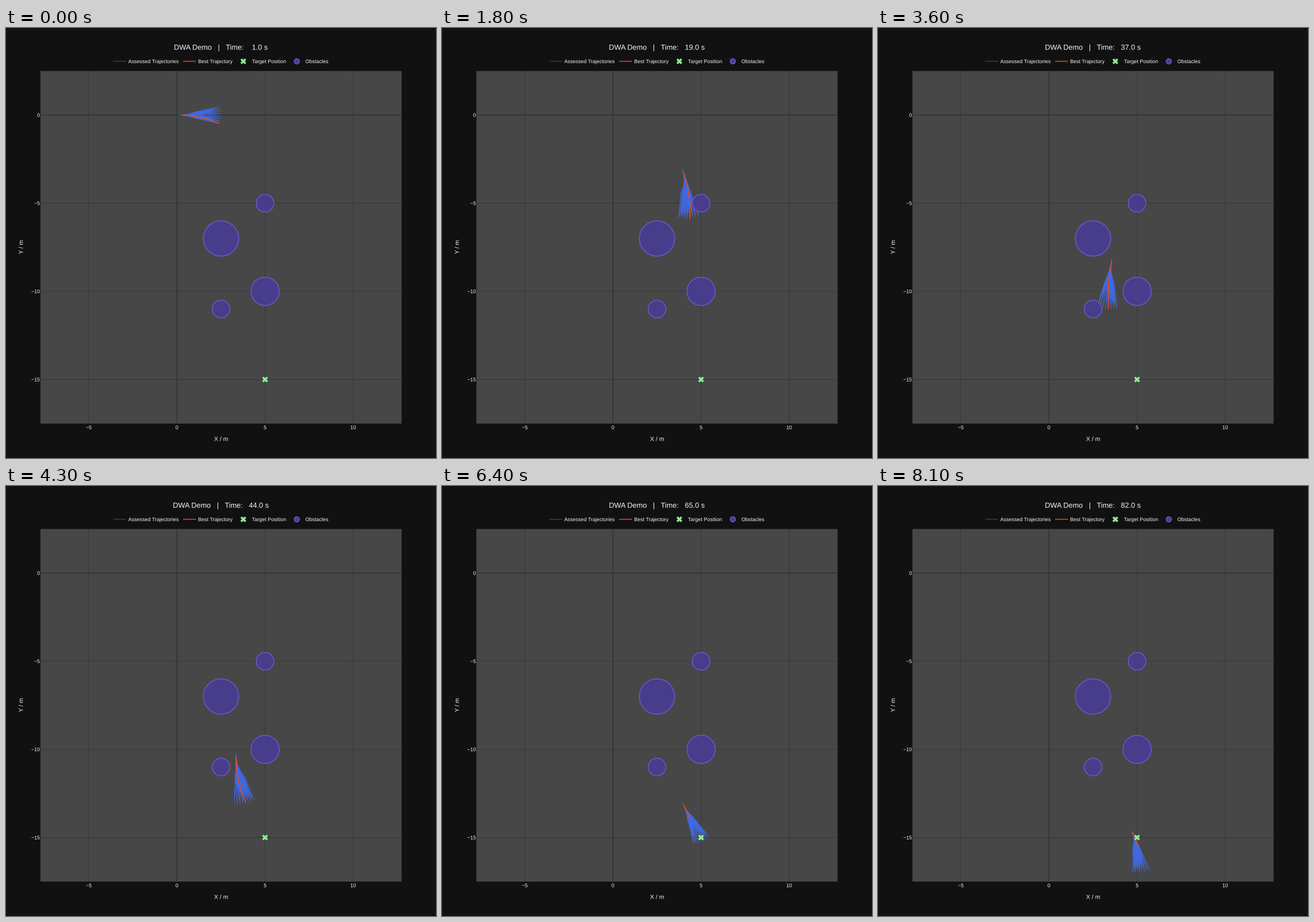
A matplotlib script for the animation above (8.2 s loop, 748 by 748 pixels).

```python
import numpy as np
import matplotlib.pyplot as plt
from matplotlib.animation import FuncAnimation
from matplotlib.collections import LineCollection
from matplotlib.patches import Circle, PathPatch, Polygon, Rectangle
from matplotlib.textpath import TextPath
from matplotlib.transforms import Affine2D

STAGE, DPI, UNITS = 748, 100, 1000
ZOOM = STAGE / UNITS
LINE = ZOOM * 72 / DPI          # one layout unit in points
METRE = 41                      # layout units per metre
FRAMES, INTERVAL = 82, 100

INK, PAPER, FIELD, GRID = "#f2f5fa", "#111111", "#474747", "#283442"
BLUE, ORANGE, GREEN = "royalblue", "orangered", "lightgreen"
FILL, EDGE = "darkslateblue", "slateblue"

fig = plt.figure(figsize=(STAGE / DPI, STAGE / DPI), dpi=DPI, facecolor=PAPER)
ax = fig.add_axes([0, 0, 1, 1])
ax.set(xlim=(0, UNITS), ylim=(UNITS, 0))
ax.axis("off")


def to_x(metres):
    return 397.5 + METRE * metres


def to_y(metres):
    return 202.5 - METRE * metres


def text_path(text, size, align="left"):
    path = TextPath((0, 0), text, size=size, prop={"family": "Liberation Sans"})
    box = path.get_extents()
    shift = {"left": 0, "center": -(box.x0 + box.x1) / 2, "right": -box.x1 - 0.5}
    return path.transformed(Affine2D().translate(shift[align], 0))


def write(x, y, text, size=12, align="left", angle=0):
    place = Affine2D().scale(1, -1).rotate_deg(angle).translate(x, y)
    return ax.add_patch(PathPatch(text_path(text, size, align), fc=INK, lw=0,
                                  zorder=6, transform=place + ax.transData))


def stroke(xs, ys, color, width, z):
    return ax.plot(xs, ys, color=color, lw=width * LINE, zorder=z, snap=False,
                   solid_capstyle="butt")[0]


def disc(x, y, radius):
    ax.add_patch(Circle((x, y), radius, fc=FILL, ec=EDGE, lw=2 * LINE, zorder=5))


def cross(x, y, size=12):
    """Two diagonal bars: one arm, turned four times."""
    arm = np.array([(1, 0), (2, 1), (1, 2)]) * size * 0.4 / np.sqrt(2)
    turns = [np.array([(0, 1), (-1, 0)])] * 4
    points = []
    for quarter in turns:
        points.extend(arm)
        arm = arm @ quarter
    ax.add_patch(Polygon(np.array(points) + (x, y), fc=GREEN, lw=0, zorder=4))


# plot area, grid and axis labels
ax.add_patch(Rectangle((80, 100), 840, 820, fc=FIELD, lw=0, zorder=0, snap=False))
for tick in range(-15, 11, 5):
    label = str(tick).replace("-", "\u2212")
    width = 1 if tick else 2
    if tick >= -5:
        stroke([to_x(tick)] * 2, [100, 920], GRID, width, 1)
        write(to_x(tick), 933, label, align="center")
    if tick <= 0:
        stroke([80, 920], [to_y(tick)] * 2, GRID, width, 1)
        write(79, to_y(tick) + 4.2, label, align="right")
write(500, 960.3, "X / m", 14, "center")
write(39.5, 510, "Y / m", 14, "center", -90)

# legend
LEGEND_Y = 77.5
stroke([249.3, 279.3], [LEGEND_Y] * 2, BLUE, 1, 2)
stroke([411.8, 441.8], [LEGEND_Y] * 2, ORANGE, 2, 2)
cross(552, LEGEND_Y)
disc(676.3, LEGEND_Y, 6)
for x, name in ((284.3, "Assessed Trajectories"), (446.8, "Best Trajectory"),
                (572, "Target Position"), (696.3, "Obstacles")):
    write(x, LEGEND_Y + 4.2, name)

# scene
cross(to_x(5), to_y(-15))
for x, y, radius in ((2.5, -7, 1), (5, -5, 0.5), (5, -10, 0.8), (2.5, -11, 0.5)):
    disc(to_x(x), to_y(y), radius * METRE)

# way points: step, stage x, stage y, heading and turn rate in degrees
STEP, X, Y, HEADING, TURN = np.array([
    (0, 301, 151.5, 0, 0),
    (1, 308.7, 151.7, 2.5, 2.5),
    (11, 388, 197, 47.8, 2.7),
    (25, 426.3, 303, 91, 2.5),
    (26, 425.8, 312, 93, 0),
    (31, 417.5, 357, 106, 1.8),
    (36, 407, 402, 101, -1.1),
    (45, 400.5, 483, 88, -2.6),
    (50, 403, 514, 70, -0.4),
    (80, 440.7, 598.3, 66, -0.3),
    (81, 442, 601, 66, 2.4)]).T
SLOW, FAST, ACCELERATION, BRAKE_END = 0.1, 0.3, 0.15, 48
HORIZON, SPREAD = 9.5, 2.5
SPEEDS, TURNS = 16, 8


def speed_at(step):
    """Metres per step: speed up at once, slow down before the target."""
    return np.clip(min(SLOW + ACCELERATION * step, SLOW + 0.05 * (BRAKE_END - step)),
                   SLOW, FAST)


def turn_at(step):
    return np.interp(step, STEP, TURN)


def position(step):
    """Cubic Hermite curve through the way points."""
    i = min(np.searchsorted(STEP, step, side="right"), len(STEP) - 1)
    ends = [i - 1, i]
    p0, p1 = np.column_stack([X, Y])[ends] / ZOOM
    v0, v1 = (METRE * speed_at(STEP[k]) * direction(np.radians(HEADING[k]))
              for k in ends)
    span = STEP[i] - STEP[i - 1]
    u = (step - STEP[i - 1]) / span
    blend = u * u * (3 - 2 * u)
    return (p0 + (p1 - p0) * blend
            + span * u * (1 - u) * ((1 - u) * v0 - u * v1))


def direction(angle):
    return np.stack([np.cos(angle), np.sin(angle)], axis=-1)


def heading_at(step):
    dx, dy = position(step + 0.01) - position(step)
    return np.arctan2(dy, dx)


def arc(start, heading, speed, turn, begin=0):
    t = np.linspace(begin, HORIZON, 24)
    half = np.radians(turn) * t / 2
    reach = METRE * speed * t * np.sinc(half / np.pi)
    return start + reach[:, None] * direction(heading + half)


title = write(500, 50.5, "DWA Demo", 17)
fan = ax.add_collection(LineCollection([], colors=BLUE, linewidths=LINE, zorder=2),
                        autolim=False)
best = stroke([], [], ORANGE, 2, 3)


def draw(step):
    clock = f"{step + 1:.1f}"
    gap = " " * (7 - len(clock))
    title.set_path(text_path(f"DWA Demo   |   Time:{gap}{clock} s", 17, "center"))

    start, heading, speed = position(step), heading_at(step), speed_at(step)
    speeds = np.linspace(max(SLOW, speed - ACCELERATION),
                         min(FAST, speed + ACCELERATION), SPEEDS)
    turns = turn_at(step) + np.linspace(-SPREAD, SPREAD, TURNS)
    fan.set_segments([arc(start, heading, v, w) for v in speeds for w in turns])

    # the chosen path is the one the robot follows next
    following = (step + 1) % FRAMES
    chosen = turns[np.argmin(abs(turns - turn_at(following)))]
    best.set_data(*arc(start, heading, speed_at(following), chosen, 0.6).T)
    return title, fan, best


animation = FuncAnimation(fig, draw, frames=FRAMES, interval=INTERVAL, repeat=True)
plt.show()
```
